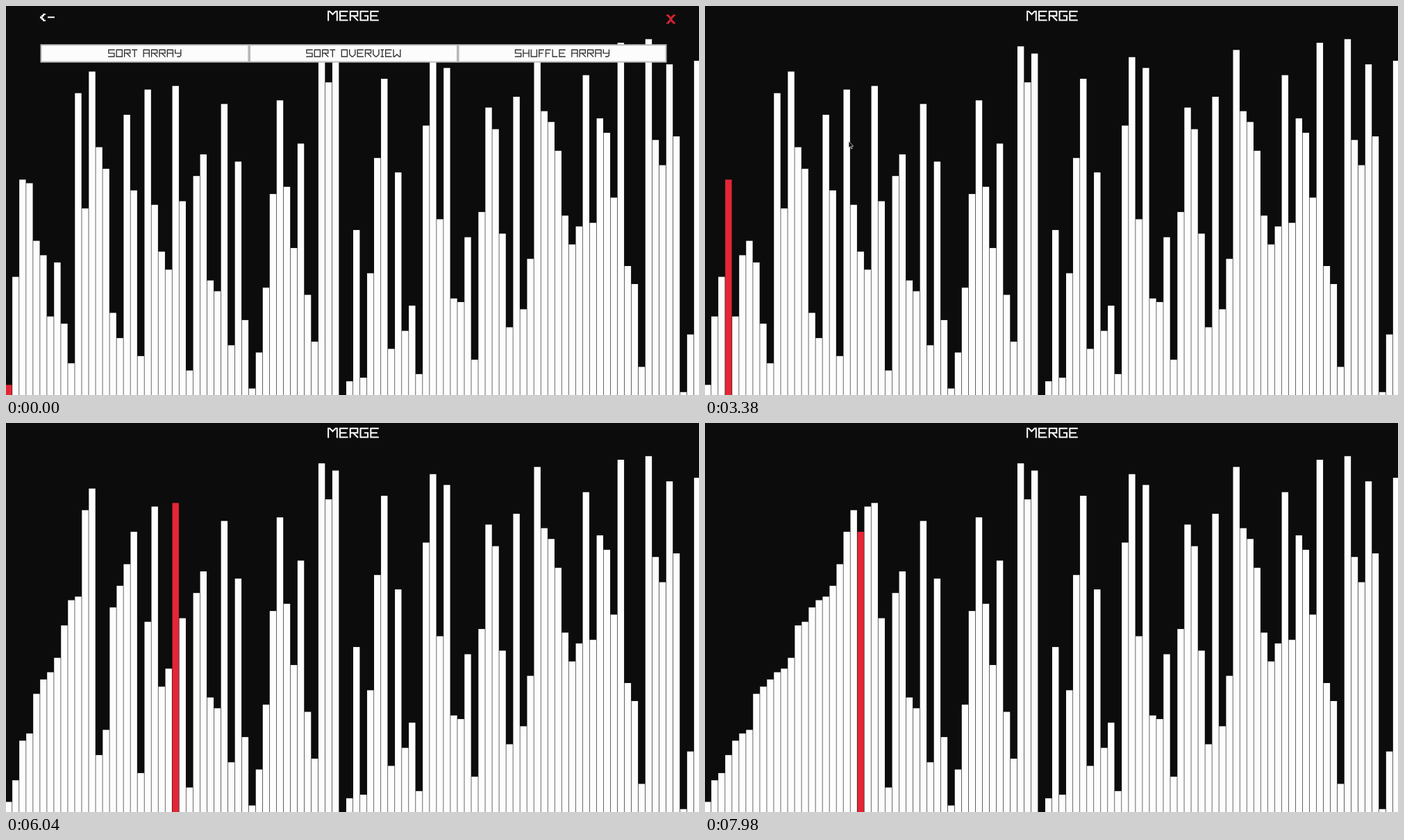
An HTML page that plays this animation: 998x561 px, repeating every 8 s.

```html
<!DOCTYPE html>
<html lang="en">
<head>
<meta charset="utf-8">
<title>Merge sort</title>
<style>
  html, body { margin: 0; width: 100%; height: 100%; overflow: hidden; background: #0c0c0d; }
  svg { display: block; width: 998px; height: 561px; }
  .glyphs { fill: none; stroke-linecap: square; }
  .label { fill: transparent; font-family: "DejaVu Sans Mono", monospace; text-anchor: middle; }
</style>
</head>
<body>
<svg id="stage" viewBox="0 0 998 561"></svg>
<script>
const LOOP = 8000, COUNT = 100;
const WHITE = '#fdfdfd', RED = '#e32636';
const stage = document.getElementById('stage');

// Bar slots ordered from the tallest value to the shortest.
const order = [
  92,88,45,76,47,61,99,95,63,12, 83,54,46,24,20,10,73,39,31,69,
  77,17,85,78,60,70,86,96,93,42, 13,79,28,53,33,94,14,56,27,2,
  3,40,18,38,87,25,21,11,68,80, 62,84,82,50,71,66,4,81,41,22,
  5,75,7,89,23,52,1,29,90,37, 30,43,64,65,58,74,15,6,34,8,
  72,57,98,16,44,32,55,36,19,67, 9,91,26,59,51,49,0,35,97,48];

// Pixel-style letters: width in units, then strokes on a unit grid.
const font = {
  A: [6, 'M0 6V0H5V6M0 3H5'],
  E: [6, 'M5 0H0V6H5M0 3H4'],
  F: [5, 'M4 0H0V6M0 3H3'],
  G: [6, 'M5 0H0V6H5V3H3'],
  H: [6, 'M0 0V6M5 0V6M0 3H5'],
  I: [3, 'M0 0H2M1 0V6M0 6H2'],
  L: [5, 'M0 0V6H4'],
  M: [7, 'M0 6V0H1L3 2L5 0H6V6'],
  O: [6, 'M0 0H5V6H0Z'],
  R: [6, 'M0 6V0H5V3H0M2 3L5 6'],
  S: [6, 'M5 0H0V3H5V6H0'],
  T: [5, 'M0 0H4M2 0V6'],
  U: [6, 'M0 0V6H5V0'],
  V: [6, 'M0 0V4L2 6H3L5 4V0'],
  W: [7, 'M0 0V6H1L3 4L5 6H6V0'],
  Y: [6, 'M0 0V3H5V0M5 3V5L4 6H2'],
  ' ': [3, '']
};

function el(name, attrs, parent = stage) {
  const node = document.createElementNS('http://www.w3.org/2000/svg', name);
  for (const key in attrs) node.setAttribute(key, attrs[key]);
  parent.appendChild(node);
  return node;
}

function write(text, cx, top, unit, color, weight, parent = stage) {
  const widths = [...text].map(c => font[c][0] + 1);
  const total = widths.reduce((a, b) => a + b) - 1;
  const g = el('g', {
    class: 'glyphs', stroke: color, 'stroke-width': weight,
    transform: `translate(${cx - total * unit / 2} ${top}) scale(${unit})`
  }, parent);
  let x = 0.5;
  [...text].forEach((c, i) => {
    if (c !== ' ') el('path', { d: font[c][1], transform: `translate(${x} .5)` }, g);
    x += widths[i];
  });
  // Selectable copy of the drawn words.
  el('text', { class: 'label', x: cx, y: top + unit * 7, 'font-size': unit * 7 }, parent).textContent = text;
  return g;
}

const show = (node, on) => node.setAttribute('visibility', on ? 'visible' : 'hidden');

// Every array write of a top-down merge sort, kept as a snapshot.
const values = [];
order.forEach((slot, k) => values[slot] = k);
const states = [{ list: values.slice(), mark: 0 }];
function sort(lo, hi) {
  if (lo >= hi) return;
  const mid = (lo + hi) >> 1;
  sort(lo, mid);
  sort(mid + 1, hi);
  const merged = values.slice(lo, hi + 1).sort((a, b) => b - a);
  merged.forEach((v, i) => {
    values[lo + i] = v;
    states.push({ list: values.slice(), mark: lo + i + 1 });
  });
}
sort(0, 24);

el('rect', { width: 998, height: 561, fill: '#0c0c0d' });
const bars = Array.from({ length: COUNT }, (_, i) =>
  el('rect', { x: (10.018 * i - 0.9).toFixed(2), width: 9.4 }));

write('MERGE', 500, 6.8, 2.11, WHITE, 0.95);

const nav = el('g', {});
el('path', {
  d: 'M56 12h-2v2h-2v2h-2v1h2v2h2v2h2M61 16.3H69',
  fill: 'none', stroke: WHITE, 'stroke-width': 1.9, 'stroke-linecap': 'square'
}, nav);
el('path', {
  d: 'M952 13.5h2v2h2v2h3v-2h2v-2h2M952 24.5h2v-2h2v-2h3v2h2v2h2M957.5 17.5v3',
  fill: 'none', stroke: RED, 'stroke-width': 1.9, 'stroke-linecap': 'square'
}, nav);

const buttons = ['SORT ARRAY', 'SORT OVERVIEW', 'SHUFFLE ARRAY'].map((text, i) => {
  const g = el('g', {}), x = 49.5 + 300.6 * i;
  const box = el('rect', { x: x + 1, y: 56.2, width: 298.8, height: 24.4, 'stroke-width': 2 }, g);
  return { g, box, text: write(text, x + 150.3, 62.4, 1.625, '#333', 0.85, g) };
});

const cursor = el('path', {
  d: 'M0 0V9.6L2.2 7.7L3.7 11L5.2 10.3L3.8 7.2H6.7Z',
  fill: '#080808', stroke: '#f4f4f4', 'stroke-width': 0.7
});

// Pointer stops: tick, x, y.
const path = [
  [-52, 836, 552], [-36, 109, 72], [-28, 150, 288], [-19, 228, 70], [-16, 130, 66],
  [4, 130, 66], [17, 207, 195], [35, 521, 530], [41, 523, 538], [44, 523, 561]];

function pointer(k) {
  const i = path.findIndex((p, n) => n && k <= p[0]);
  if (k < path[0][0] || i < 0) return null;
  const [a, b] = [path[i - 1], path[i]];
  const f = (k - a[0]) / (b[0] - a[0]);
  return [a[1] + (b[1] - a[1]) * f, a[2] + (b[2] - a[2]) * f];
}

// Three ticks per 140 ms, lasting 20, 20 and 100 ms; tick 0 is the click.
function tickAt(t) {
  const u = t - 2640, group = Math.floor(u / 140), rest = u - group * 140;
  return group * 3 + (rest < 20 ? 0 : rest < 40 ? 1 : 2);
}

function draw(t) {
  const k = tickAt(t);
  const late = k < 29 || (k > 55 && k < 67) ? 1 : 0;
  const { list, mark } = states[Math.min(states.length - 1, Math.max(0, k - late))];
  bars.forEach((bar, i) => {
    const top = 47.8 + list[i] * 5.194;
    bar.setAttribute('y', top.toFixed(2));
    bar.setAttribute('height', Math.max(0, 561 - top).toFixed(2));
    bar.setAttribute('fill', i === mark ? RED : WHITE);
  });

  const last = pointer(k - 1);
  const hover = !!last && last[0] > 50 && last[0] < 350 && last[1] > 56 && last[1] < 81;
  show(nav, k < 1);
  buttons.forEach(({ g, box, text }, i) => {
    const lit = hover && i === 0;
    show(g, k < 0 || (k === 0 && i === 0));
    box.setAttribute('fill', lit ? '#68bdfa' : '#fcfcfc');
    box.setAttribute('stroke', lit ? '#1478dc' : '#bdbdbd');
    text.setAttribute('stroke', lit ? '#0b78e3' : '#333');
  });

  const at = pointer(k);
  show(cursor, at);
  if (at) cursor.setAttribute('transform', `translate(${at[0].toFixed(1)} ${at[1].toFixed(1)})`);
}

function loop() {
  draw(performance.now() % LOOP);
  requestAnimationFrame(loop);
}
loop();
</script>
</body>
</html>
```
